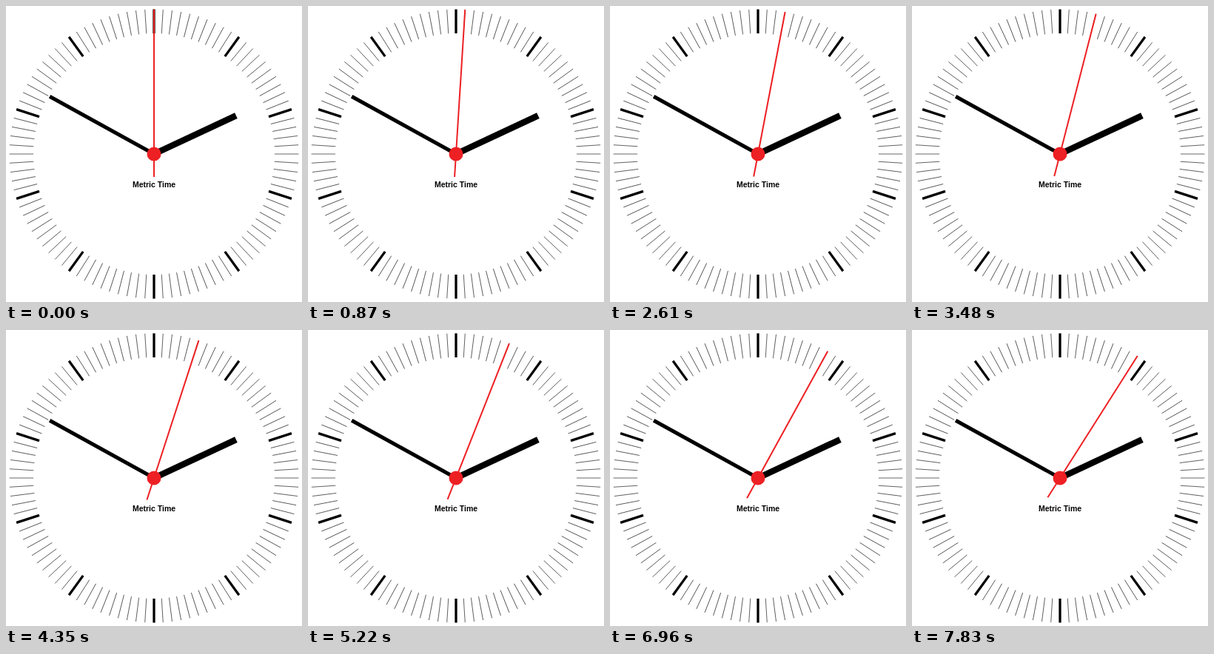
Recreate the animation shown at these times as an HTML page. Size 400x400 px, loop 8 s.

```html
<!DOCTYPE html>
<html lang="en">
<head>
<meta charset="utf-8">
<title>Metric Time</title>
<style>
  html, body { margin: 0; height: 100%; overflow: hidden; background: #fff; }
  svg { display: block; width: 100%; height: 100%; }
  text { font: bold 10.5px "Liberation Sans", Arial, sans-serif; text-anchor: middle; }
</style>
</head>
<body>
<svg viewBox="-200 -200 400 400">
  <g id="dial" stroke="#000"></g>
  <text y="44.5">Metric Time</text>
  <g stroke="#000">
    <line y2="-161" stroke-width="5" transform="rotate(298.9)"/>
    <line y2="-122.5" stroke-width="8.5" transform="rotate(64.9)"/>
  </g>
  <line id="second" y1="31" y2="-195.5" stroke="#ed2024" stroke-width="2"/>
  <circle r="9.5" fill="#ed2024"/>
</svg>
<script>
  const LOOP = 8000, STEP = 870, ANGLE = 3.6;
  const dial = document.getElementById('dial');
  const second = document.getElementById('second');

  dial.innerHTML = Array.from({ length: 100 }, (_, i) =>
    `<line y1="-163" y2="-195.5" stroke-width="${i % 10 ? 0.6 : 3.3}" transform="rotate(${i * ANGLE})"/>`
  ).join('');

  // The second hand jumps one division per metric second.
  function draw() {
    const tick = Math.floor(performance.now() % LOOP / STEP);
    second.setAttribute('transform', `rotate(${tick * ANGLE})`);
    requestAnimationFrame(draw);
  }
  draw();
</script>
</body>
</html>
```
